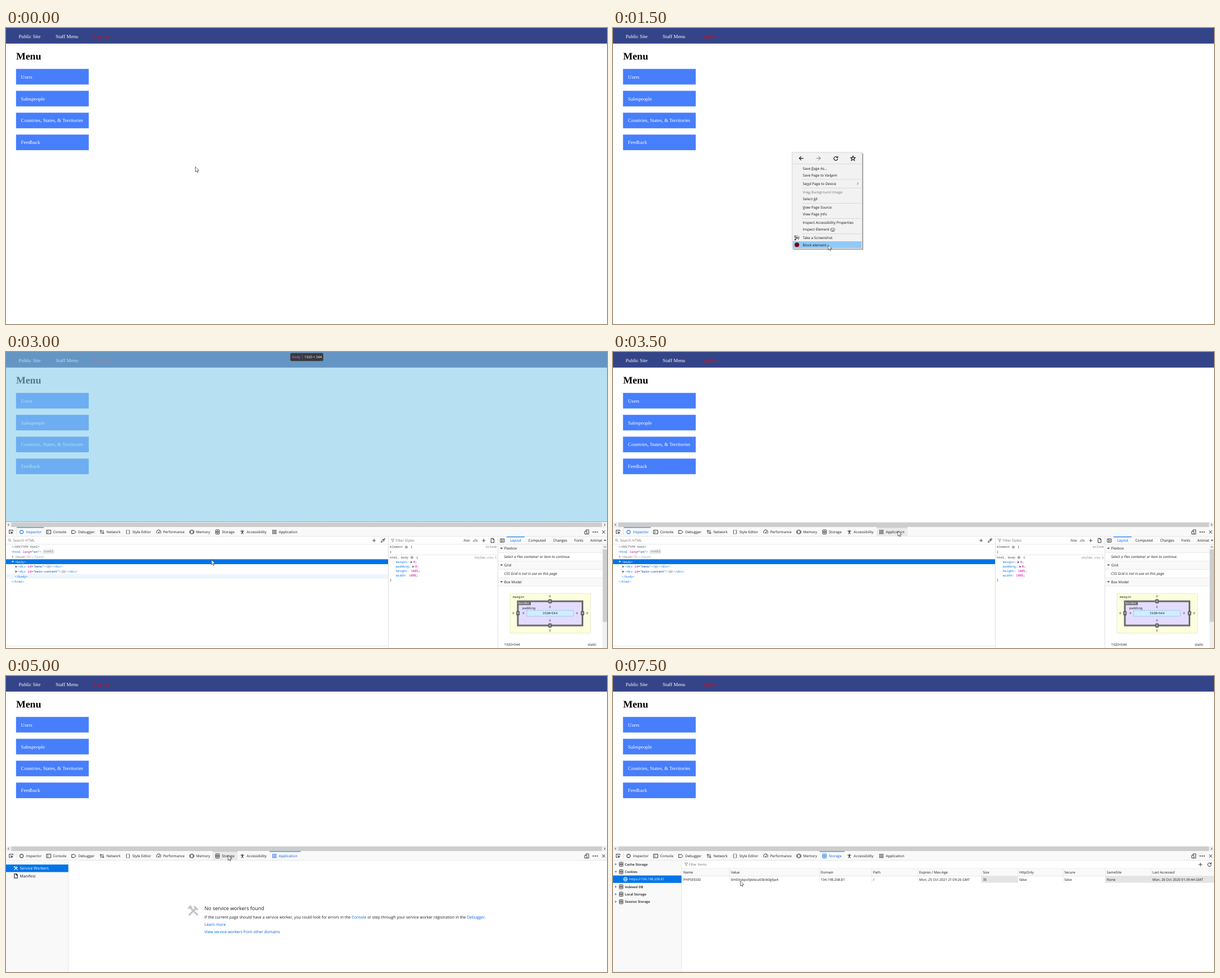
Animation, 1065 px wide and 526 px high, one loop 8 s. Source, as an HTML page with a canvas:

```html
<!DOCTYPE html>
<html lang="en">
<head>
<meta charset="utf-8">
<title>Inspecting a session cookie</title>
<style>
html, body { margin: 0; width: 100%; height: 100%; overflow: hidden; background: #fff; }
canvas { display: block; width: 100vw; height: 100vh; }
</style>
</head>
<body>
<canvas id="stage" width="1065" height="526"></canvas>
<script>
const ctx = document.getElementById('stage').getContext('2d');
const W = 1065, H = 526, STEP = 500, LOOP = 8000, UNIT = W / 1920;
const SANS = '"Open Sans", "Noto Sans", sans-serif';
const SERIF = '"Liberation Serif", serif';
const MONO = '"Noto Sans Mono", "DejaVu Sans Mono", monospace';
const INK = '#18181a', GREY = '#737373', LINE = '#e0e0e2', BAR = '#f9f9fa';
const BLUE = '#0060df', SELECT = '#0074e8', PINK = '#dd00a9', NAVY = '#003eaa';

// ---- drawing helpers ----
function rect(x, y, w, h, color) {
  ctx.fillStyle = color;
  ctx.fillRect(x, y, w, h);
}

function frame(x, y, w, h, color, { fill, width = 0.7, dash = [], radius = 0 } = {}) {
  ctx.beginPath();
  ctx.roundRect(x, y, w, h, radius);
  if (fill) { ctx.fillStyle = fill; ctx.fill(); }
  ctx.strokeStyle = color;
  ctx.lineWidth = width;
  ctx.setLineDash(dash);
  ctx.stroke();
  ctx.setLineDash([]);
}

// y is the middle of the capitals; returns the x where the text ends
function text(s, x, y, { size = 6.3, color = INK, font = SANS, style = '', align = 'left' } = {}) {
  ctx.font = `${style} ${size}px ${font}`;
  ctx.textRendering = 'geometricPrecision';
  ctx.textAlign = align;
  ctx.fillStyle = color;
  ctx.fillText(s, x, y + size * (font === SERIF ? 0.33 : 0.36));
  return x + ctx.measureText(s).width;
}

const mono = (s, x, y, color = INK, opt = {}) => text(s, x, y, { size: 5.5, font: MONO, color, ...opt });

function runs(parts, x, y, draw = mono) {
  for (const [s, color] of parts) x = draw(s, x, y, color);
  return x;
}

function tri(x, y, down, color = '#4a4a4f') {
  ctx.fillStyle = color;
  ctx.beginPath();
  if (down) { ctx.moveTo(x - 2.3, y - 1.2); ctx.lineTo(x + 2.3, y - 1.2); ctx.lineTo(x, y + 1.5); }
  else { ctx.moveTo(x - 1.2, y - 2.2); ctx.lineTo(x + 1.5, y); ctx.lineTo(x - 1.2, y + 2.2); }
  ctx.fill();
}

// icons live on a 16-unit grid
const ICON = {
  pick: 'M14 6V2H2v11h4M7 7l7 3-3 1-1 3z',
  inspector: 'M4 3h8l1 1v8l-1 1H4l-1-1V4zM6 1v2M10 1v2M6 13v2M10 13v2M1 8h2M13 8h2',
  console: 'M1 2h14v12H1zM4 5l3 3-3 3',
  debugger: 'M1 3h9l5 5-5 5H1z',
  network: 'M4.5 14V2M1 6l3.5-4L8 6M11.5 2v12M8 10l3.5 4L15 10',
  style: 'M6 1C2 1 5 7 2 8C5 9 2 15 6 15M10 1c4 0 1 6 4 7c-3 1 0 7-4 7',
  performance: 'M3 13A7 7 0 1 1 13 13M8 10L11 5M7 10h2v2H7z',
  memory: 'M4 2h8v12H4zM1 4v8M15 4v8',
  storage: 'M3 1h10l1 1v12l-1 1H3l-1-1V2zM2 8h3M11 8h3M6 5h4v6H6z',
  access: 'M8 1v2M2 5h12M8 5v5M7 5v5l-2 5M9 5v5l2 5',
  app: [2, 7, 12].flatMap(x => [2, 7, 12].map(y => `M${x} ${y}h2v2h-2z`)).join(''),
  screens: 'M5 1h9v14H8M5 1v4M1 6h7v9H1z',
  close: 'M3 3l10 10M13 3L3 13',
  plus: 'M8 1v14M1 8h14',
  dropper: 'M2 14l1-4 5-5 3 3-5 5zM7 3l6 6M10 5l3-4 2 2-4 3z',
  search: 'M2 6a4 4 0 1 0 8 0a4 4 0 1 0-8 0M9 9l5 5',
  funnel: 'M2 3h12L9.500 9v5l-3-2V9z',
  gear: 'M3 8a5 5 0 1 0 10 0a5 5 0 1 0-10 0M6 8a2 2 0 1 0 4 0a2 2 0 1 0-4 0',
  page: 'M3 1h7l3 3v11H3zM9 1v4h4',
  panel: 'M1 2h14v12H1zM6 2v12M12 5L9 8l3 3',
  globe: 'M1 8a7 7 0 1 0 14 0a7 7 0 1 0-14 0M1 8h14M8 1C4 5 4 11 8 15C12 11 12 5 8 1',
  back: 'M15 8H2M8 2L2 8l6 6',
  forward: 'M1 8h13M8 2l6 6-6 6',
  reload: 'M14 9A6 6 0 1 1 12 4M14 1v5H9',
  star: 'M8 1l2 5h5l-4 3.500 1.500 5L8 11.500l-4.500 3 1.500-5L1 6h5z',
  snip: 'M1 4V1h4M7 1h3M15 6v4M4 11l11-8M4 4l10 9M1 13a2 2 0 1 0 4 0a2 2 0 1 0-4 0M1 5a2 2 0 1 0 4 0',
  tools: 'M2 14L12 4M9 2l5 5M3 3l11 11M1 5l4-4M4 5l2-2',
  left: 'M10 4L6 8l4 4',
  right: 'M6 4l4 4-4 4',
  up: 'M4 10l4-4 4 4'
};

function icon(name, x, y, color = INK, size = 8.6, weight = 1.6) {
  ctx.save();
  ctx.translate(x - size / 2, y - size / 2);
  ctx.scale(size / 16, size / 16);
  ctx.strokeStyle = color;
  ctx.lineWidth = weight;
  ctx.stroke(new Path2D(ICON[name]));
  ctx.restore();
}

function pointer([x, y]) {
  ctx.save();
  ctx.translate(x, y);
  ctx.scale(UNIT, UNIT);
  const arrow = new Path2D('M0 0V16.500L3.700 13L6.200 18.500L8.600 17.500L6.200 12H11.500Z');
  ctx.fillStyle = '#fff';
  ctx.fill(arrow);
  ctx.strokeStyle = '#111';
  ctx.lineWidth = 1.1;
  ctx.stroke(arrow);
  ctx.restore();
}

// ---- web page ----
function page() {
  rect(0, 0, W, H, '#fff');
  rect(0, 0, W, 27.7, '#334488');
  const serif = { size: 16 * UNIT, font: SERIF, color: '#fff' };
  text('Public Site', 22.6, 15, serif);
  text('Staff Menu', 88, 15, serif);
  text('Log out', 155.3, 15, { ...serif, color: '#ff0000' });
  text('Menu', 17.9, 50.2, { size: 32 * UNIT, font: SERIF, style: 'bold', color: '#000' });
  ['Users', 'Salespeople', 'Countries, States, & Territories', 'Feedback'].forEach((label, i) => {
    const y = 72.7 + i * 38.9;
    rect(17.75, y, 128.9, 27.7, '#467efc');
    text(label, 26.6, y + 14, serif);
  });
}

// ---- context menu; an underscore precedes the access key ----
const ITEMS = [
  ['Save _Page As...', 249.3], ['Save Page to Var_kem', 261.5], ['Se_nd Page to Device', 276.5],
  ['Vie_w Background Image', 291.6], ['Select _All', 303.7], ['_View Page Source', 318.7],
  ['View Page _Info', 330.9], ['Inspect Accessibility Properties', 345.9],
  ['Inspect Element (_Q)', 358.1], ['Take a Screenshot', 373.1], ['Block element...', 385.3]
];

function contextMenu(active) {
  rect(319.5, 223, 124, 171, 'rgba(0,0,0,.25)');
  rect(319, 222.5, 123.8, 170.9, 'rgba(0,0,0,.4)');
  frame(317.4, 220.9, 124.4, 171.6, '#c4c4c4', { fill: '#f2f2f2' });
  icon('back', 333.5, 231.6, '#111', 9, 2);
  icon('forward', 364.3, 231.6, '#858585', 9, 1.8);
  icon('reload', 394.8, 231.6, '#111', 9, 2);
  icon('star', 425.2, 231.6, '#111', 9.4, 1.8);
  rect(319, 241, 121.500, 0.7, '#cfcfcf');
  for (const y of [268.6, 283.9, 311, 338.2, 365.4]) rect(334.5, y, 106, 0.7, '#cfcfcf');
  rect(318.7, ITEMS[active][1] - 6.3, 121.7, 12.3, '#91c9f7');
  ITEMS.forEach(([label, y], i) => {
    const color = i === 3 ? '#777' : '#111', at = label.indexOf('_');
    text(label.replace('_', ''), 336.3, y, { color });
    if (at < 0) return;
    const x = 336.3 + ctx.measureText(label.slice(0, at)).width;
    rect(x, y + 3, ctx.measureText(label[at + 1]).width, 0.6, color);
  });
  icon('right', 433.8, 276.5, '#333', 8, 1.5);
  icon('snip', 325.8, 373.1, '#111', 8.8, 1.7);
  ctx.fillStyle = '#800000';
  ctx.beginPath();
  ctx.arc(325.9, 385.2, 4, 0, 7);
  ctx.fill();
}

// ---- developer tools ----
const TABS = [
  ['Inspector', 'inspector', 19, 67], ['Console', 'console', 67, 111.5], ['Debugger', 'debugger', 111.5, 161.5],
  ['Network', 'network', 161.5, 207.5], ['Style Editor', 'style', 207.5, 262], ['Performance', 'performance', 262, 320.7],
  ['Memory', 'memory', 320.7, 366.2], ['Storage', 'storage', 366.2, 410.2], ['Accessibility', 'access', 410.2, 467],
  ['Application', 'app', 467, 522]
];

function toolbar(active, hover) {
  rect(0, 302.3, W, H, '#fff');
  rect(0, 302.3, W, 9, '#f0f0f0');
  rect(9.4, 303, 1046.6, 8, '#cdcdcd');
  icon('left', 4.5, 307, '#333', 8, 1.8);
  icon('right', 1060.8, 307, '#333', 8, 1.8);
  rect(0, 311.3, W, 16.5, BAR);
  rect(0, 327.3, W, 0.7, LINE);
  icon('pick', 9, 319.8);
  rect(18, 314, 0.6, 11, '#d4d4d6');
  for (const [label, glyph, x, end] of TABS) {
    const on = label === active;
    if (label === hover && !on) {
      rect(x, 311.3, end - x, 16, '#ebebec');
      rect(x, 311.3, end - x, 1.1, '#c2c2c4');
    }
    if (on) rect(x, 311.3, end - x, 1.2, '#0a84ff');
    icon(glyph, x + 8.6, 319.8, on ? BLUE : INK);
    text(label, x + 16.4, 320, { color: on ? BLUE : INK });
  }
  icon('screens', 1029.4, 319.8);
  for (const x of [1040.5, 1044, 1047.5]) rect(x - 0.8, 319, 1.7, 1.7, INK);
  icon('close', 1059, 319.8);
}

function badge(x, y) {
  frame(x, y - 2.4, 7.2, 4.8, '#b1b1b3', { fill: '#ececee', radius: 1.2, width: 0.5 });
  for (const d of [1.7, 3.3, 4.9]) rect(x + d, y - 0.4, 0.9, 0.9, '#333');
}

function folded(open, close, x, y) {
  tri(x - 3.5, y, false);
  const end = runs(open, x, y);
  badge(end + 1.1, y);
  mono(close, end + 9.6, y, SELECT);
}

function markup(hoverEnd) {
  icon('search', 7, 334.8, GREY, 7);
  text('Search HTML', 12.6, 335, { color: GREY });
  icon('plus', 652.3, 335, INK, 7, 1.8);
  icon('dropper', 668, 335);
  rect(0, 341.2, 677, 0.7, LINE);
  mono('<!DOCTYPE html>', 9.5, 346, '#4a4a4f', { style: 'italic' });
  runs([['<html ', SELECT], ['lang', PINK], ['="', INK], ['en', NAVY], ['"', INK], ['>', SELECT]], 9.5, 354.9);
  frame(65.3, 351.9, 19.3, 6, '#b1b1b3', { radius: 1.5, width: 0.6 });
  mono('scroll', 67, 354.8, INK, { size: 4.6 });
  ctx.globalAlpha = 0.55;
  folded([['<head>', INK]], '</head>', 15.5, 363.7);
  ctx.globalAlpha = 1;
  rect(0, 368.3, 677, 8.7, SELECT);
  tri(12, 372.6, true, '#fff');
  mono('<body>', 15.5, 372.6, '#fff');
  ['menu', 'main-content'].forEach((id, i) => folded(
    [['<div ', SELECT], ['id', PINK], ['="', INK], [id, NAVY], ['"', INK], ['>', SELECT]], '</div>', 21.5, 381.4 + i * 8.9));
  if (hoverEnd) rect(0, 394.8, 677, 7.7, '#eef5fd');
  rect(15.2, 377, 0.5, 17.8, '#d8d8da');
  mono('</body>', 15.5, 399.2, SELECT);
  mono('</html>', 9.5, 408, SELECT);
  rect(0, 522, 677, 0.7, LINE);
}

function rules() {
  rect(677, 328, 0.8, 198, '#d7d7db');
  icon('funnel', 685, 334.8, GREY, 7);
  text('Filter Styles', 690.3, 335, { color: GREY });
  text(':hov', 809.7, 335);
  text('.cls', 826.4, 335);
  icon('plus', 846.6, 335, INK, 7, 1.8);
  icon('page', 862.2, 335);
  rect(678, 341.2, 193.5, 0.7, LINE);
  const selector = (name, y, source) => {
    const x = mono(name, 680, y, '#4a4a4f');
    icon('gear', x + 6.3, y + 0.2, '#5a5a5e', 6.6);
    mono('{', x + 14, y);
    mono(source, 869.6, y, GREY, { align: 'right' });
  };
  selector('element', 346.5, 'inline');
  mono('}', 680, 355);
  rect(678, 360.2, 193.5, 0.7, LINE);
  selector('html, body', 365, 'styles.css:1');
  [['margin', '0'], ['padding', '0'], ['height', '100%'], ['width', '100%']].forEach(([name, value], i) => {
    const y = 373.5 + i * 7.9;
    let x = runs([[name, SELECT], [': ', INK]], 690.8, y);
    if (i < 2) { tri(x + 1, y, false); x += 4.5; }
    runs([[value, PINK], [';', INK]], x, y);
  });
  mono('}', 680, 405);
}

function boxModel() {
  frame(893.2, 429.3, 142.4, 70.3, '#cfcf86', { fill: '#fdffdf', dash: [2.2, 1.4] });
  frame(907, 443, 114.5, 43, '#6a6a6d', { fill: '#e3dcff', width: 3 });
  frame(922.8, 459.3, 82.6, 10.2, '#6aa5d8', { fill: '#cdeeff', dash: [2.2, 1.4] });
  mono('margin', 898.2, 435.3);
  rect(906, 442.7, 24, 7, '#6a6a6d');
  mono('border', 907.8, 446, '#fff');
  mono('padding', 915, 454.6);
  mono('1920×544', 964, 464.2, INK, { align: 'center' });
  const zero = (x, y, color = '#5a5a5e') => mono('0', x, y, color, { align: 'center' });
  const sides = [[964, 434, 964, 495], [964, 452.7, 964, 476.7], [899, 464.2, 1030, 464.2], [916.8, 464.2, 1012, 464.2]];
  for (const [x1, y1, x2, y2] of sides) { zero(x1, y1); zero(x2, y2); }
  for (const [x, y] of [[964, 443], [964, 486], [907.2, 464.2], [1021.6, 464.2]]) {
    frame(x - 2.7, y - 3.6, 5.4, 7.2, '#58585c', { fill: '#58585c', radius: 1.3, width: 0.5 });
    zero(x, y, '#fff');
  }
  text('1920×544', 882.7, 520, { size: 6.1 });
  text('static', 1046.3, 520, { align: 'right' });
}

function layout() {
  rect(871.3, 328, 0.8, 198, '#d7d7db');
  rect(872, 328, 193, 13.5, BAR);
  rect(872, 341.2, 193, 0.7, LINE);
  icon('panel', 879.5, 335, INK, 8);
  rect(887, 328, 32, 1.2, '#0a84ff');
  [['Layout', 893.2], ['Computed', 925.6], ['Changes', 969.4], ['Fonts', 1006.9], ['Animat', 1035.5]]
    .forEach(([s, x], i) => text(s, x, 335, { color: i ? INK : BLUE }));
  tri(1061.500, 335, true);
  [['Flexbox', 342], ['Grid', 371.8], ['Box Model', 401.5]].forEach(([s, y]) => {
    rect(872, y, 185, 14, BAR);
    rect(872, y - 0.6, 185, 0.6, LINE);
    rect(872, y + 14, 185, 0.7, LINE);
    tri(878, y + 7, true);
    text(s, 882.8, y + 7);
  });
  text('Select a Flex container or item to continue.', 882.8, 364, { style: 'italic' });
  text('CSS Grid is not in use on this page', 882.8, 393.9, { style: 'italic' });
  boxModel();
  rect(1057, 342, 8, 184, '#f0f0f0');
  rect(1057.5, 351, 7.5, 128.5, '#cdcdcd');
  icon('up', 1061.2, 346.5, '#333', 7, 2);
}

function inspector(hover, hoverEnd) {
  toolbar('Inspector', hover);
  markup(hoverEnd);
  rules();
  layout();
}

function highlight() {
  rect(0, 0, W, 302, 'rgba(135,206,235,.6)');
  ctx.setLineDash([2, 1.4]);
  ctx.strokeStyle = '#47788c';
  ctx.lineWidth = 0.8;
  ctx.beginPath();
  ctx.moveTo(0, 301.5);
  ctx.lineTo(W, 301.5);
  ctx.stroke();
  ctx.setLineDash([]);
  frame(504.2, 2.2, 57.6, 13.500, '#38383d', { fill: '#38383d', radius: 1.4 });
  text('body', 507, 9, { color: '#e07be0', size: 6.3 });
  rect(524.800, 5, 0.6, 8, '#77777c');
  text('1920 × 544', 528.8, 9, { color: '#fff', size: 6.1 });
}

function application(hover) {
  toolbar('Application', hover);
  rect(0, 328, 110.5, 198, BAR);
  rect(110.4, 328, 0.7, 198, LINE);
  rect(0, 335, 110.4, 13.4, SELECT);
  icon('tools', 17.5, 341.8, '#fff', 8.4, 2);
  text('Service Workers', 24.5, 342, { size: 6.9, color: '#fff' });
  icon('page', 17.5, 355.2, INK, 8.6, 2);
  text('Manifest', 24.5, 355.5, { size: 6.9 });
  icon('tools', 332, 417.3, '#c4c4c6', 21, 2.4);
  text('No service workers found', 351.8, 413.2, { size: 8.9 });
  const body = (s, x, y, color) => text(s, x, y, { size: 6.95, color });
  runs([['If the current page should have a service worker, you could look for errors in the ', INK], ['Console', BLUE],
    [' or step through your service worker registration in the ', INK], ['Debugger', BLUE], ['.', INK]], 351.8, 428, body);
  body('Learn more', 351.8, 441.3, BLUE);
  body('View service workers from other domains', 351.8, 454, BLUE);
}

const COLUMNS = [
  ['Name', 'PHPSESSID', 122], ['Value', '0m0trskpofpk6ou65ktk0glqs4', 206.3], ['Domain', '104.198.208.81', 365.500],
  ['Path', '/', 458.4], ['Expires / Max-Age', 'Mon, 25 Oct 2021 21:09:26 GMT', 540], ['Size', '35', 652.8],
  ['HttpOnly', 'false', 717.3], ['Secure', 'false', 797.3], ['SameSite', 'None', 872.4],
  ['Last Accessed', 'Mon, 26 Oct 2020 01:39:44 GMT', 953.4]
];

function storage() {
  toolbar('Storage');
  rect(0, 328, 121.500, 198, BAR);
  rect(121.4, 328, 0.7, 198, LINE);
  ['Cache Storage', 'Cookies', '', 'Indexed DB', 'Local Storage', 'Session Storage'].forEach((s, i) => {
    const y = 334.6 + i * 13.3;
    if (!s) return;
    tri(5, y, s === 'Cookies', '#77777a');
    icon('storage', 14.5, y, INK, 8.4);
    text(s, 21, y, { size: 5.9, style: '600' });
  });
  rect(0, 354.5, 121.4, 13.2, SELECT);
  icon('globe', 22, 361.2, '#fff', 8);
  text('https://104.198.208.81', 29, 361.2, { size: 5.95, color: '#fff' });

  icon('funnel', 129.6, 334.6, GREY, 7);
  text('Filter Items', 134.3, 334.8, { color: GREY, size: 6.1 });
  icon('plus', 1041, 335, INK, 7.4, 1.8);
  icon('reload', 1057, 335, INK, 8.4, 1.9);
  rect(122, 341.6, 943, 0.7, LINE);
  rect(122, 342.3, 943, 12.9, BAR);
  rect(122, 355, 943, 0.7, LINE);
  COLUMNS.forEach(([head, value, x], i) => {
    const end = i < 9 ? COLUMNS[i + 1][2] : W;
    if ([5, 8, 9].includes(i)) rect(x, 355.4, end - x, 12, '#e4e4e5');
    if (i) rect(x, 342, 0.7, 25.4, LINE);
    text(head, x + 2.6, 349, { size: 6.1 });
    text(value, x + 2.6, 361.7, { size: 6.05 });
  });
  rect(0, 525.3, W, 0.7, LINE);
}

// ---- timeline: one pose per step ----
const none = () => {};
const POSES = [
  [335.5, 246.6, none], [328.500, 235.5, none], [316.7, 219.7, none],
  [381.3, 385.4, () => contextMenu(10)], [369.4, 379.5, () => contextMenu(10)], [364.4, 354.5, () => contextMenu(8)],
  [364.1, 369, () => { highlight(); inspector('', true); }],
  [504.9, 318.1, () => inspector('Application', false)],
  [364.2, 321, () => application('Memory')],
  [296.3, 323.8, () => application('Performance')],
  [393.500, 318.5, () => application('Storage')],
  [285.3, 336.5, storage], [36.4, 391.6, storage], [18.4, 362.5, storage], [189.4, 368.8, storage], [225.6, 364, storage]
];

function draw(now) {
  const [x, y, scene] = POSES[Math.floor((now % LOOP) / STEP)];
  page();
  scene();
  pointer([x, y]);
}

const start = performance.now();
function tick() {
  draw(performance.now() - start);
  requestAnimationFrame(tick);
}
tick();
</script>
</body>
</html>
```
